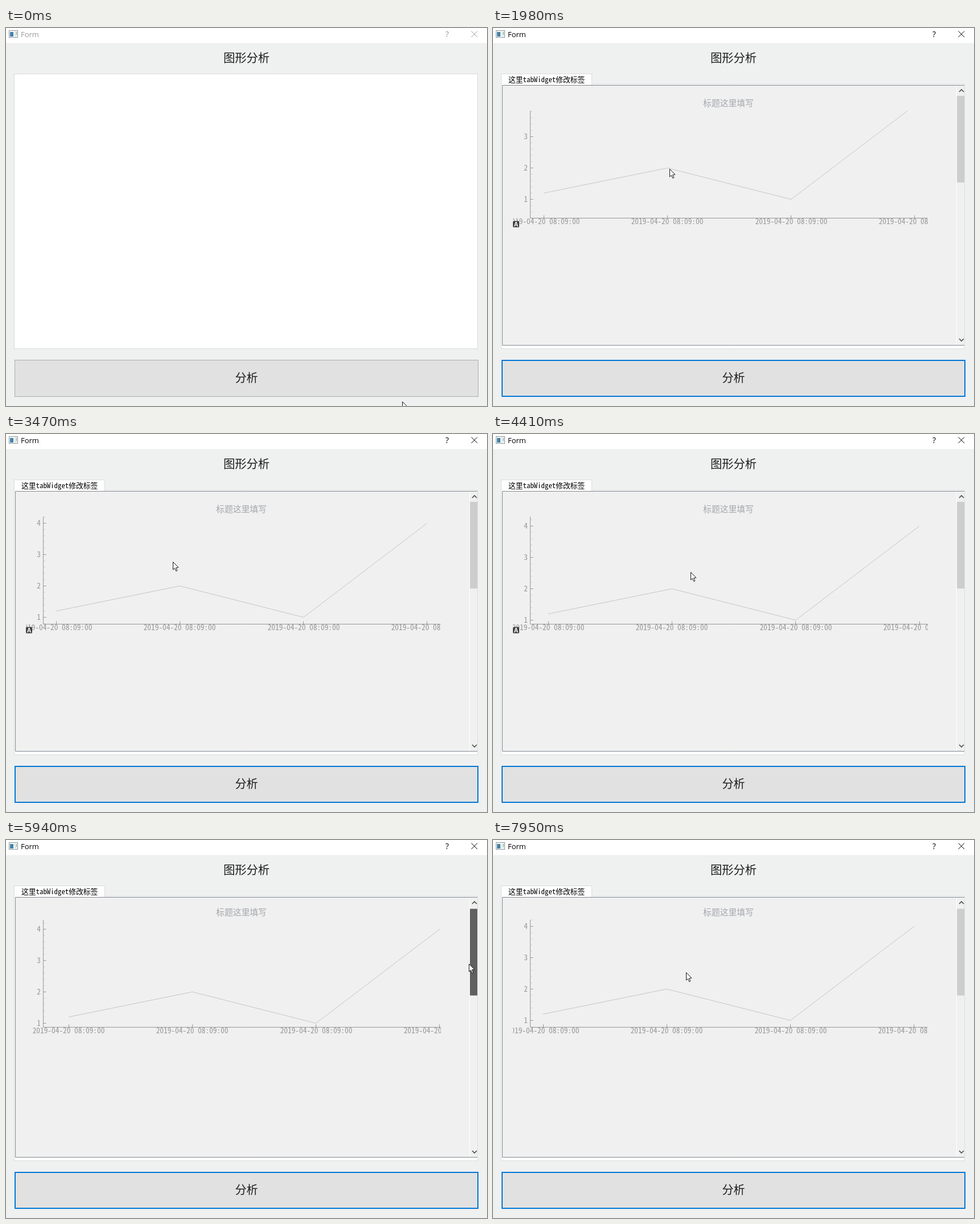
Write an HTML page with a canvas that moves like this. It is 845 px wide and 663 px high and loops after 8000 ms.

```html
<!DOCTYPE html>
<html lang="zh">
<head>
<meta charset="utf-8">
<style>
  html, body { margin: 0; width: 100%; height: 100%; overflow: hidden; background: #eff0f0; }
  canvas { display: block; }
</style>
</head>
<body>
<canvas id="stage" width="845" height="663"></canvas>
<script>
const ctx = document.getElementById('stage').getContext('2d');
const LOOP = 8000;
const CJK = '"Noto Sans CJK SC Light", "Noto Sans CJK SC", "Noto Sans CJK", sans-serif';
const MONO = '"Noto Sans Mono CJK SC", "Noto Sans CJK SC", "Liberation Mono", monospace';
const UI = '"Open Sans", "Noto Sans", sans-serif';
const INK = '#1c1c1c', GRAY = '#969696', BLUE = '#0078d7';

const clamp = (v, lo, hi) => Math.min(hi, Math.max(lo, v));
const ramp = (t, from, to) => clamp((t - from) / (to - from), 0, 1);

// Pointer moves: start time, end time, destination
const MOVES = [
  [70, 380, 452, 618], [760, 850, 453, 552], [850, 1350, 309, 268],
  [1350, 1980, 310, 247], [1980, 2370, 339, 269], [2460, 2910, 356, 280],
  [3060, 3210, 279, 215], [3440, 3470, 293, 224], [3470, 3760, 338, 237],
  [4000, 4410, 347, 242], [4410, 4540, 360, 242], [4540, 4770, 783, 213],
  [4850, 5090, 816, 212], [5300, 5600, 816, 312], [5600, 5940, 813, 217],
  [6090, 6550, 430, 262], [6700, 7230, 40, 338], [7490, 7950, 339, 232]
];

function cursorAt(t) {
  let x = 696, y = 655;
  for (const [from, to, toX, toY] of MOVES) {
    const k = ramp(t, from, to);
    x += (toX - x) * k;
    y += (toY - y) * k;
  }
  return [x, y];
}

// The chart follows the pointer from where it was grabbed
function drag(t, from, to) {
  const [x0, y0] = cursorAt(from), [x, y] = cursorAt(clamp(t, from, to));
  return [x - x0, y - y0];
}

function panAt(t) {
  if (t < 4000) return drag(t, 1350, 2910).map(v => v * (1 - ramp(t, 3060, 3210)));
  return t < 7230 ? drag(t, 4000, 4540) : [0, 0];
}

const THUMB_RATIO = 0.334;
const scrollAt = t => Math.max(0, (cursorAt(clamp(t, 5300, 5940))[1] - 215.3) / THUMB_RATIO);

function fill(x, y, w, h, color) {
  ctx.fillStyle = color;
  ctx.fillRect(x, y, w, h);
}

function box(x, y, w, h, color, border, width = 1) {
  fill(x, y, w, h, border);
  fill(x + width, y + width, w - 2 * width, h - 2 * width, color);
}

function path(points, color, width = 1) {
  ctx.beginPath();
  points.forEach(([x, y]) => ctx.lineTo(x, y));
  ctx.strokeStyle = color;
  ctx.lineWidth = width;
  ctx.stroke();
}

function text(str, x, y, font, color, align = 'center') {
  ctx.font = font;
  ctx.fillStyle = color;
  ctx.textAlign = align;
  ctx.fillText(str, x, y);
}

function clipped(x, y, w, h, draw) {
  ctx.save();
  ctx.beginPath();
  ctx.rect(x, y, w, h);
  ctx.clip();
  draw();
  ctx.restore();
}

function drawTitleBar(active) {
  const color = active ? '#000' : '#999';
  fill(0, 0, 845, 26.5, '#fff');
  box(5, 4, 16, 13, '#fff', '#8a9494');
  fill(7, 7, 6, 8, '#4682a8');
  fill(14, 6, 5, 9, '#dfeee6');
  fill(18, 7, 1, 5, '#7f9b92');
  text('Form', 26, 16, `13px ${UI}`, color, 'left');
  text('?', 775, 16, `14px ${UI}`, color);
  path([[817.5, 5.5], [828, 16]], color);
  path([[828, 5.5], [817.5, 16]], color);
}

function drawButton(t) {
  const hover = ramp(t, 220, 380) - ramp(t, 800, 1000);
  const mix = (a, b) => Math.round(a + (b - a) * hover);
  const color = `rgb(${mix(225, 229)},${mix(225, 241)},${mix(225, 251)})`;
  const focused = t > 1000;
  box(15, 582, 815, 65, color, focused || hover > 0.2 ? BLUE : '#adadad', focused ? 2 : 1);
  text('分析', 422.5, 621, `300 20px ${CJK}`, INK);
}

function drawChart(dx, dy) {
  const left = 65.5, right = 763.5, top = 145, bottom = 333.5;
  const toX = i => 88 + i * 217.3 + dx;
  const toY = v => 376.5 - v * 55 + dy;
  const crisp = v => Math.floor(v) + 0.5;
  const labelFont = `300 13.33px ${MONO}`;

  text('标题这里填写', 413.5, 137, `300 14.8px ${CJK}`, '#a4a7ac');
  path([[left, top], [left, bottom]], GRAY);
  path([[left, bottom], [right, bottom]], GRAY);

  for (let n = -5; n <= 30; n++) {
    const y = toY(n / 5), major = n % 5 === 0;
    if (y < top || y > bottom) continue;
    path([[left, crisp(y)], [left + (major ? 5 : 3), crisp(y)]], major ? GRAY : '#c6c6c6');
    if (major) text(n / 5, 61, Math.round(y + 4), labelFont, GRAY, 'right');
  }

  clipped(35, top, 729, 230, () => {
    for (let i = 0; i < 4; i++) {
      const x = toX(i);
      if (x > right) continue;
      path([[crisp(x), bottom - 5], [crisp(x), bottom]], GRAY);
      text('2019-04-20 08:09:00', Math.round(x), 344, labelFont, GRAY);
    }
  });

  clipped(left, top, right - left, bottom - top, () =>
    path([1.2, 2, 1, 4].map((v, i) => [toX(i), toY(v)]), '#c6c6c6'));
}

function drawAutoBadge() {
  ctx.fillStyle = '#414141';
  ctx.beginPath();
  ctx.roundRect(35, 338.5, 11, 11, 1.5);
  ctx.fill();
  text('A', 40.5, 348, 'bold 10.5px "Liberation Sans", sans-serif', '#fff');
}

function drawScrollBar(scroll, dragging) {
  fill(813, 102, 15, 454, '#f0f0f0');
  fill(814, 102, 1, 454, '#fff');
  fill(815, 119 + scroll * THUMB_RATIO, 13, 152, dragging ? '#606060' : '#cdcdcd');
  path([[819, 112], [823, 108], [827, 112]], '#505050', 1.7);
  path([[819, 545], [823, 549], [827, 545]], '#505050', 1.7);
}

function drawTabPage(t) {
  const scroll = scrollAt(t);
  box(14, 98, 815, 465, '#fff', '#dcdcdc');
  box(14, 80, 160, 20, '#fff', '#dcdcdc');
  fill(15, 98, 158, 3, '#fff');
  text('这里tabWidget修改标签', 27, 95, `12.8px ${MONO}`, '#000', 'left');

  fill(16, 100, 812, 457, '#f0f0f0');
  path([[828, 100.5], [16.5, 100.5], [16.5, 556.5], [828, 556.5]], '#828790');

  clipped(17, 101, 796, 455, () => {
    ctx.translate(0, -scroll);
    drawChart(...panAt(t));
    if ((t > 1400 && t < 4740) || (t > 6130 && t < 7230)) drawAutoBadge();
  });
  drawScrollBar(scroll, t >= 5260 && t < 6110);
}

function drawCursor(x, y) {
  ctx.save();
  ctx.translate(Math.round(x) + 0.5, Math.round(y) + 0.5);
  ctx.fillStyle = '#fff';
  ctx.strokeStyle = '#15151f';
  ctx.lineWidth = 1;
  const arrow = new Path2D('M0 0V13.5L3 10.8L5.3 16L7.4 15.1L5.2 10L9.4 9.6Z');
  ctx.fill(arrow);
  ctx.stroke(arrow);
  ctx.restore();
}

function render(t) {
  const opened = t >= 540;
  fill(0, 0, 845, 663, '#eff0f0');
  drawTitleBar(opened);
  text('图形分析', 422.5, 60, `300 20.3px ${CJK}`, INK);
  if (opened) drawTabPage(t);
  else box(14, 80, 815, 483, '#fff', '#d9d9d9');
  drawButton(t);
  drawCursor(...cursorAt(t));
}

const start = performance.now();
function tick() {
  render((performance.now() - start) % LOOP);
  requestAnimationFrame(tick);
}
tick();
</script>
</body>
</html>
```
